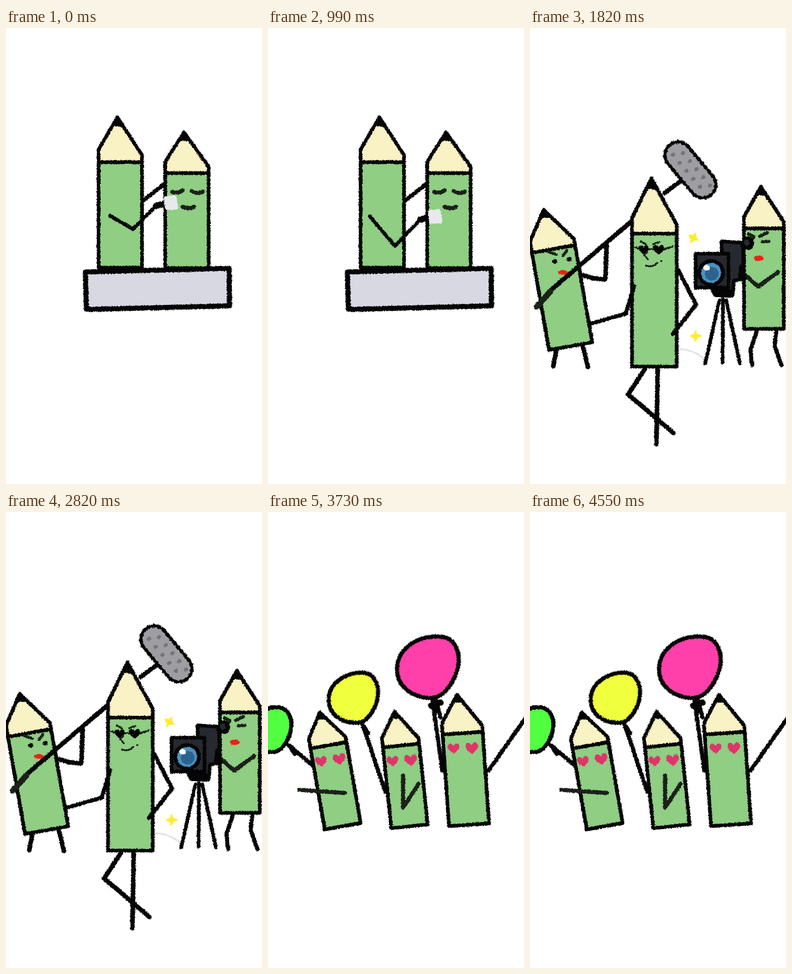
Recreate the animation shown at these times as an HTML page. Size 561 by 998 pixels, loop 4960 ms.

```html
<!DOCTYPE html>
<html lang="en">
<head>
<meta charset="utf-8">
<title>Pencils</title>
<style>
  html, body { margin: 0; width: 100%; height: 100%; overflow: hidden; background: #fff; }
  svg { display: block; width: 100%; height: 100%; }
  .scene, .pose { display: none; }
  .on { display: inline; }
</style>
</head>
<body>
<svg id="stage" viewBox="0 0 561 998" fill="none" stroke-linecap="round" stroke-linejoin="round"></svg>
<script>
const GREEN = '#8fce83', WOOD = '#f9f2c5', INK = '#050505', SOFT = '#1a2118', RED = '#f02015', STEEL = '#26292f';

const path = (d, stroke, width, fill = 'none') =>
  `<path d="${d}" stroke="${stroke}" stroke-width="${width}" fill="${fill}"/>`;
const line = (d, width = 9, color = INK) => path(d, color, width);
const shape = (d, fill, width = 8) => path(d, INK, width, fill);
const oval = (x, y, rx, ry, fill) => `<ellipse cx="${x}" cy="${y}" rx="${rx}" ry="${ry}" fill="${fill}"/>`;
const place = (x, y, angle, content, size = 1) =>
  `<g transform="translate(${x} ${y}) rotate(${angle}) scale(${size})">${content}</g>`;
const scene = (...parts) => `<g class="scene" filter="url(#crayon)">${parts.join('')}</g>`;
const poses = drawPose => [0, 1].map(n => `<g class="pose" data-pose="${n}">${drawPose(n)}</g>`).join('');

// Placed by the middle of the band between wood and body; `face` uses the same local space
function pencil(x, y, width, length, head, angle = 0, face = '') {
  const half = width / 2, tip = -6.5, left = -.28 * head, right = -.16 * head, k = .23;
  const towards = (sx, sy) => `${tip + (sx - tip) * k} ${-head + (sy + head) * k}`;
  return place(x, y, angle,
    shape(`M${-half} 0H${half}V${length}H${-half}Z`, GREEN) +
    shape(`M${tip} ${-head}L${half} ${right}V0H${-half}V${left}Z`, WOOD) +
    shape(`M${tip} ${-head}L${towards(-half, left)}L${towards(half, right)}Z`, INK, 5) + face);
}

const heart = (x, y, fill, size = 1) => place(x, y, 0,
  `<path d="M0 11C-7 6-13 1-12-5C-11-12-3-12 0-5C3-12 11-12 12-5C13 1 7 6 0 11Z" fill="${fill}"/>`, size);

const sparkle = (x, y, angle) => place(x, y, angle, path('M0-12L3-4L12 0L4 3L0 12L-4 4L-12 0L-3-3Z', '#ffec2e', 2, '#ffec2e'));

function makeupArm(n) {
  const x = 361 + 5 * n, y = 383 + 30 * n, elbow = 440 + 37 * n;
  return line(`M${228 - 5 * n} ${411 + n}L278 ${elbow}L${x - 34} ${y + 8}`, 8) +
    line(`M${x - 32} ${y + 6}L${x - 14} ${y + 2}`, 14) +
    place(x, y, 0, path('M-11-10L8-12L12 10L-8 11Z', '#e9e9ed', 9, '#e9e9ed'));
}

const makeup = scene(
  pencil(250.5, 293.5, 95, 231, 98),
  line('M303 376L346 342'),
  pencil(396.5, 317.5, 95, 208, 89),
  shape('M174 534L489 526L490 608L176 616Z', '#d8d8e3', 11),
  line('M365 359q13 4 22-4M407 357q13 8 25 1M387 391q13 7 25 0', 9, SOFT),
  poses(makeupArm));

function microphone() {
  const cover = attrs => `<rect x="-71" y="-29" width="142" height="58" rx="29" stroke="${INK}" ${attrs}/>`;
  const dots = Array.from({ length: 10 }, (_, i) => oval(11.5 * i - 50, i % 2 ? -11 : 8, 4, 5, '#737378'));
  return place(351.5, 310.5, 50,
    cover('fill="#9d9da2" stroke-width="6"') + cover('stroke-width="9" stroke-dasharray="0 12"') + dots.join(''));
}

const camera =
  line('M415 596L384 734M423 594L422 732M430 596L460 734', 8) +
  shape('M420 467L466 470L470 548L447 553L444 586L404 583L398 570L420 490Z', STEEL) +
  oval(478, 471, 13, 15, INK) + oval(475, 470, 6, 7, STEEL) +
  line('M466 524L463 546', 15) +
  shape('M363 494H435V568H363Z', STEEL) +
  shape('M402 576H443L442 586H409Z', INK) +
  oval(397, 536, 30, 30, INK) + oval(397, 536, 22, 22, '#4c91be') +
  oval(398, 538, 15, 15, '#2d628f') + oval(387, 525, 7, 6, '#fff');

const filming = scene(
  line('M295 361L333 333', 10), microphone(),

  line('M58 704L51 740M116 697L127 742', 10),
  pencil(51.5, 483.5, 96, 216, 88, -10),
  line('M40 490L57 496M72 498L81 487', 6, SOFT),
  oval(54, 511, 6, 5, INK), oval(86, 506, 6, 5, INK), oval(72, 535, 11, 5, RED),
  line('M112 540L140 548L165 550L168 474', 10),
  line('M14 610L50 570L220 425', 10), line('M15 610L45 576', 13, SOFT),

  line('M252 746L215 802L314 886M280 746L277 911', 10),
  pencil(272.5, 450, 98, 291, 121),
  line('M228 565L210 625L130 648M325 530L364 605L313 670'),
  line('M230 480L241 483M258 484H272M292 485L313 478', 4, SOFT),
  heart(249, 485, INK, .9), heart(282, 485, INK),
  line('M243 467L255 474M270 473L284 468M256 491q-9 4-3 9l5 6M254 520q17 4 25-6M287 510h1', 4, SOFT),
  line('M329 703Q360 705 382 724', 4, '#e4e4e4'),

  line('M497 663L483 705L487 738M540 661L536 695L551 738'),
  pencil(512.5, 438.5, 87, 220, 91),
  line('M479 451L490 456L487 463M503 456L520 448M509 468L523 467', 7, SOFT),
  oval(501, 504, 11, 6, RED),
  line('M474 543L500 566L544 534', 9, SOFT),
  camera,
  poses(n => n
    ? sparkle(358, 459, 28) + sparkle(363, 674, 0)
    : sparkle(176, 414, 45) + sparkle(194, 558, 4) + sparkle(186, 687, 37)));

// The string runs from the rim straight towards the shoulder, with a hand just below the rim
function balloonArm(x, y, radius, fill, shoulderX, shoulderY, tilt) {
  const angle = Math.atan2(shoulderY - y, shoulderX - x);
  const along = reach => `${x + reach * Math.cos(angle)} ${y + reach * Math.sin(angle)}`;
  const skin = `<path d="M20-66C48-67 64-40 64-12C64 18 46 66 12 67C-25 70-65 50-64 6C-64-40-12-66 20-66Z"
    fill="${fill}" stroke="${INK}" stroke-width="${9 * 66 / radius}"/>`;
  return place(x, y, tilt, skin, radius / 66) +
    line(`M${along(radius * 1.12)}L${shoulderX} ${shoulderY}`) +
    line(`M${along(radius * 1.25)}l9 14`, 11);
}

const partyArms = n =>
  balloonArm(45 - 42 * n, 453 + 22 * n, 49, '#52ff40', 100, 570 - 14 * n, 5 * n) +
  balloonArm(155 + 32 * n, 413 - 8 * n, 55, '#f0ff3e', 257, 612, 5 * n) +
  balloonArm(285 + 65 * n, 366 - 29 * n, 67 + n, '#ff40aa', 382, 578 - 12 * n, 9 * n) +
  line(`M${318 + 40 * n} ${447 - 23 * n}l20-7`, 14) +
  (n ? line('M483 566L563 453M368 410L378 450') : line('M480 547L522 417'));

const heartEyes = heart(-22, 32, '#e0346a', 1.05) + heart(18, 34, '#e0346a', 1.15);

const party = scene(
  poses(partyArms),
  pencil(132.5, 510.5, 80, 180, 74, -10, heartEyes),
  pencil(291.5, 511, 80, 178, 75, -6, heartEyes),
  pencil(426.5, 484, 88, 201, 85, -4, heartEyes),
  poses(n =>
    line(`M${66 + 2 * n} 608l100 7M296 ${582 - 5 * n}L296 647L${324 + 6 * n} 595`, 9, SOFT) +
    (n ? '' : line('M98 566L110 602', 9, SOFT))));

document.getElementById('stage').innerHTML = `
  <filter id="crayon" filterUnits="userSpaceOnUse" x="-10" y="-10" width="581" height="1018" color-interpolation-filters="sRGB">
    <feTurbulence type="fractalNoise" baseFrequency=".35" numOctaves="2" seed="4"/>
    <feDisplacementMap in="SourceGraphic" scale="5" xChannelSelector="R" yChannelSelector="G"/>
    <feGaussianBlur stdDeviation=".5"/>
  </filter>${makeup}${filming}${party}`;

// Each scene alternates twice between its two poses
const holds = [330, 500, 410];
const loop = 4 * holds.reduce((sum, hold) => sum + hold);
const sceneNodes = document.querySelectorAll('.scene');
const poseNodes = document.querySelectorAll('.pose');
const start = performance.now();

function draw() {
  let time = (performance.now() - start) % loop, current = 0;
  while (time >= 4 * holds[current]) time -= 4 * holds[current++];
  const step = Math.floor(time / holds[current]) % 2;
  sceneNodes.forEach((node, i) => node.classList.toggle('on', i === current));
  poseNodes.forEach(node => node.classList.toggle('on', +node.dataset.pose === step));
  requestAnimationFrame(draw);
}
draw();
</script>
</body>
</html>
```
